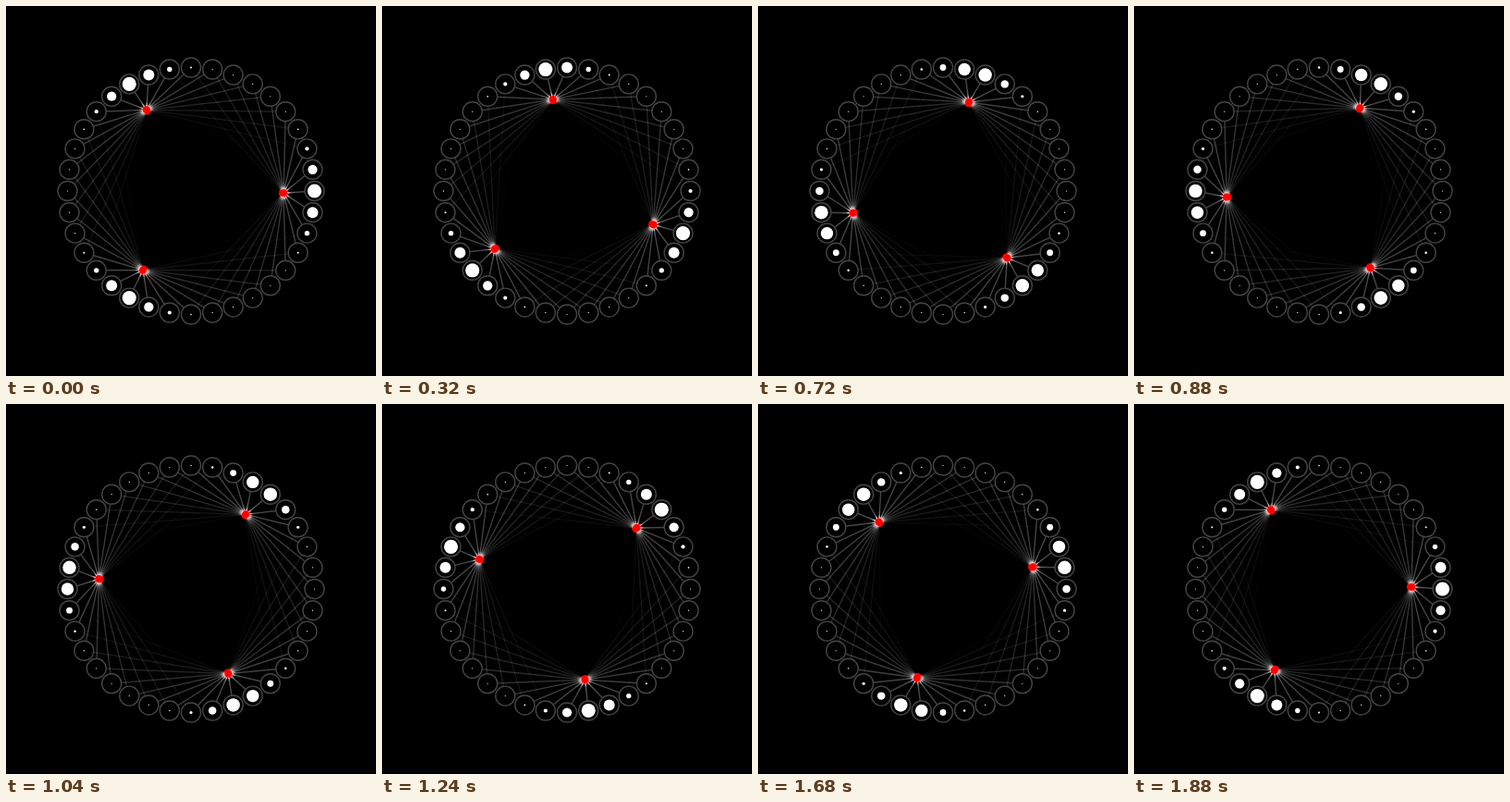
Recreate the animation shown at these times as an HTML page. Size 400x400 px, loop 1920 ms.

```html
<!DOCTYPE html>
<html lang="en">
<head>
<meta charset="utf-8">
<title>Orbiting hubs</title>
<style>
  html, body { margin: 0; width: 100%; height: 100%; overflow: hidden; background: #000; }
  svg { display: block; width: 100%; height: 100%; }
</style>
</head>
<body>
<svg id="stage" viewBox="0 0 400 400">
  <defs>
    <radialGradient id="beam" gradientUnits="userSpaceOnUse" cx="0" cy="0" r="20">
      <stop offset=".18" stop-color="#fff" stop-opacity="0"/>
      <stop offset=".24" stop-color="#fff" stop-opacity=".85"/>
      <stop offset=".32" stop-color="#fff" stop-opacity=".7"/>
      <stop offset=".42" stop-color="#fff" stop-opacity=".4"/>
      <stop offset=".75" stop-color="#fff" stop-opacity=".29"/>
    </radialGradient>
  </defs>
</svg>
<script>
const LOOP = 1920, STEP = 40;
const HUBS = 3, NODES = 36;
const HUB_ORBIT = 100, NODE_ORBIT = 133.5, REACH = 195;
const SECTOR = 360 / HUBS;

const stage = document.getElementById('stage');

function add(parent, tag, attrs) {
  const el = document.createElementNS('http://www.w3.org/2000/svg', tag);
  set(el, attrs);
  parent.appendChild(el);
  return el;
}

function set(el, attrs) {
  for (const key in attrs) el.setAttribute(key, attrs[key]);
}

function polar(radius, degrees) {
  const a = degrees * Math.PI / 180;
  return { x: 200 + radius * Math.cos(a), y: 200 + radius * Math.sin(a) };
}

const hubs = Array.from({ length: HUBS }, () => {
  const group = add(stage, 'g', {});
  add(group, 'circle', { r: 5.2, fill: '#f00' });
  const lines = Array.from({ length: NODES }, () =>
    add(group, 'line', { x1: 0, y1: 0, stroke: 'url(#beam)', 'stroke-width': 1.4 }));
  return { group, lines };
});

const nodes = Array.from({ length: NODES }, (_, i) => {
  const angle = i * 360 / NODES;
  const { x, y } = polar(NODE_ORBIT, angle);
  add(stage, 'circle', { cx: x, cy: y, r: 10.5, fill: '#000', stroke: '#444', 'stroke-width': 1.4 });
  const dot = add(stage, 'circle', { cx: x, cy: y, fill: '#fff' });
  return { angle, x, y, dot };
});

function render(time) {
  const frame = Math.floor((time % LOOP) / STEP);
  const turn = (frame + 0.5) * SECTOR * STEP / LOOP;

  hubs.forEach(({ group, lines }, h) => {
    const hub = polar(HUB_ORBIT, turn + h * SECTOR);
    set(group, { transform: `translate(${hub.x} ${hub.y})` });
    nodes.forEach((node, i) => {
      const dx = node.x - hub.x, dy = node.y - hub.y;
      const fade = 1 - (dx * dx + dy * dy) / (REACH * REACH);
      set(lines[i], { x2: dx, y2: dy, opacity: Math.max(0, fade) });
    });
  });

  // Dots swell as the nearest hub passes by.
  for (const { angle, dot } of nodes) {
    const offset = (angle - turn + 360 + SECTOR / 2) % SECTOR - SECTOR / 2;
    set(dot, { r: 0.6 + 7 * Math.exp(-((offset / 17) ** 2)) });
  }
}

const start = performance.now();
function tick() {
  render(performance.now() - start);
  requestAnimationFrame(tick);
}
tick();
</script>
</body>
</html>
```
